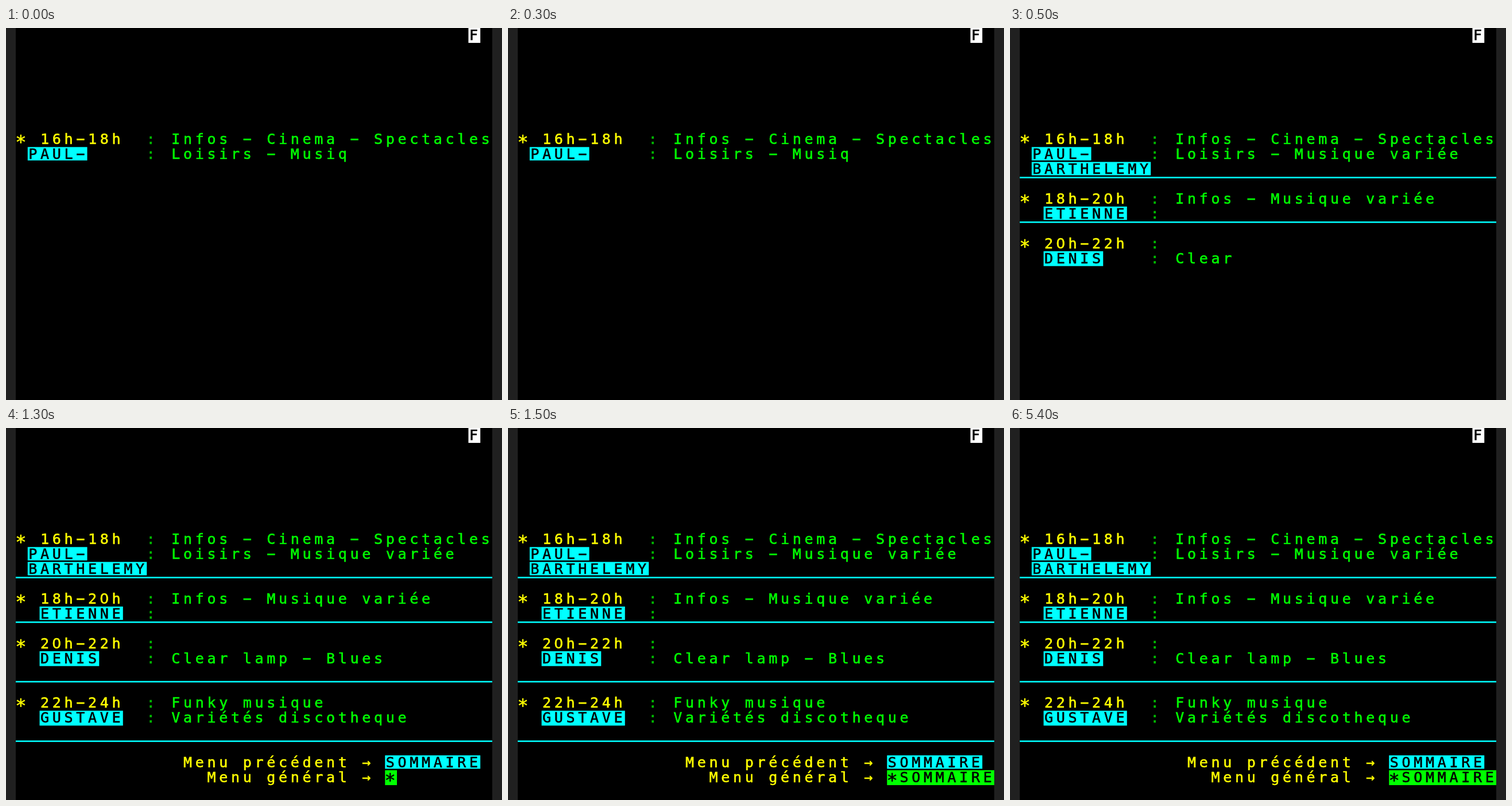
Recreate the animation shown at these times as an HTML page. Size 864 by 648 pixels, loop 8 s.

```html
<!DOCTYPE html>
<html lang="fr">
<head>
<meta charset="utf-8">
<title>Programme radio</title>
<style>
  html, body { margin: 0; width: 100%; height: 100%; overflow: hidden; background: #000; }
  svg { display: block; width: 864px; height: 648px; }
  text { font: 25px "DejaVu Sans Mono", monospace; text-anchor: middle; stroke-width: .6; }
  .zero { font-family: "DejaVu Sans", sans-serif; }
  .star { font-size: 32px; }
</style>
</head>
<body>
<svg id="screen" viewBox="0 0 864 648">
  <rect width="864" height="648" fill="#000"/>
  <path d="M0 0h17v648h-17zM847 0h17v648h-17z" fill="#202020"/>
</svg>
<script>
const LOOP = 8000, STEP = 500;
const LEFT = 17, CELL_W = 830 / 40, CELL_H = 648 / 25, DOT = CELL_H / 10;
const YELLOW = '#ff0', GREEN = '#0f0', CYAN = '#0ff', WHITE = '#fff', BLACK = '#000';
const screen = document.getElementById('screen');

function add(parent, tag, attrs) {
  const node = document.createElementNS('http://www.w3.org/2000/svg', tag);
  for (const key in attrs) node.setAttribute(key, attrs[key]);
  return parent.appendChild(node);
}

// One group for each block of the page as it arrives.
const blocks = [0, 1, 2, 3].map(() => add(screen, 'g', {}));
let block = blocks[0];

// Text on the 40 x 25 grid, one character centred in each cell.
function write(row, col, color, string) {
  const chars = [...string];
  const x = chars.map((_, i) => (LEFT + (col + i) * CELL_W + 9).toFixed(2)).join(' ');
  const text = add(block, 'text', { x, y: row * CELL_H + 8 * DOT, fill: color, stroke: color });
  for (const part of string.split(/(0)/)) {
    if (part === '0') add(text, 'tspan', { class: 'zero' }).textContent = part;
    else text.append(part);
  }
  return text;
}

function star(row, col, color) {
  const text = write(row, col, color, '*');
  text.setAttribute('class', 'star');
  text.setAttribute('dy', 7);
}

function box(row, col, color, cells, height = CELL_H) {
  add(block, 'rect', {
    x: LEFT + col * CELL_W, y: row * CELL_H, width: cells * CELL_W, height, fill: color
  });
}

function label(row, col, color, string, height) {
  box(row, col, color, string.length, height);
  write(row, col, BLACK, string);
}

const nameTag = (row, col, string) => label(row, col, CYAN, string, 9 * DOT);
const rule = row => box(row, 0, CYAN, 40, DOT);
const colon = row => write(row, 10.9, '#0b0', ':');

function slot(row, hours) {
  star(row, 0, YELLOW);
  write(row, 2, YELLOW, hours);
  colon(row);
  colon(row + 1);
}

label(0, 38, WHITE, 'F');
slot(7, '16h−18h');
write(7, 13, GREEN, 'Infos − Cinema − Spectacles');
nameTag(8, 1, 'PAUL−');
write(8, 13, GREEN, 'Loisirs − Musiq');

block = blocks[1];
write(8, 28, GREEN, 'ue variée');
nameTag(9, 1, 'BARTHELEMY');
rule(10);
slot(11, '18h−20h');
write(11, 13, GREEN, 'Infos − Musique variée');
nameTag(12, 2, 'ETIENNE');
rule(13);
slot(14, '20h−22h');
label(15, 2, CYAN, 'DENIS');
write(15, 13, GREEN, 'Clear');

block = blocks[2];
write(15, 19, GREEN, 'lamp − Blues');
rule(17);
slot(18, '22h−24h');
write(18, 13, GREEN, 'Funky musique');
label(19, 2, CYAN, 'GUSTAVE');
write(19, 13, GREEN, 'Variétés discotheque');
rule(21);
write(22, 14, YELLOW, 'Menu précédent');
write(22, 29, YELLOW, '→');
nameTag(22, 31, 'SOMMAIRE');
write(23, 16, YELLOW, 'Menu général');
write(23, 29, YELLOW, '→');
box(23, 31, GREEN, 1);
star(23, 31, BLACK);

block = blocks[3];
label(23, 32, GREEN, 'SOMMAIRE');

const start = performance.now();
function draw() {
  const time = (performance.now() - start) % LOOP;
  blocks.forEach((group, i) => {
    group.style.display = time >= i * STEP ? '' : 'none';
  });
  requestAnimationFrame(draw);
}
draw();
</script>
</body>
</html>
```
